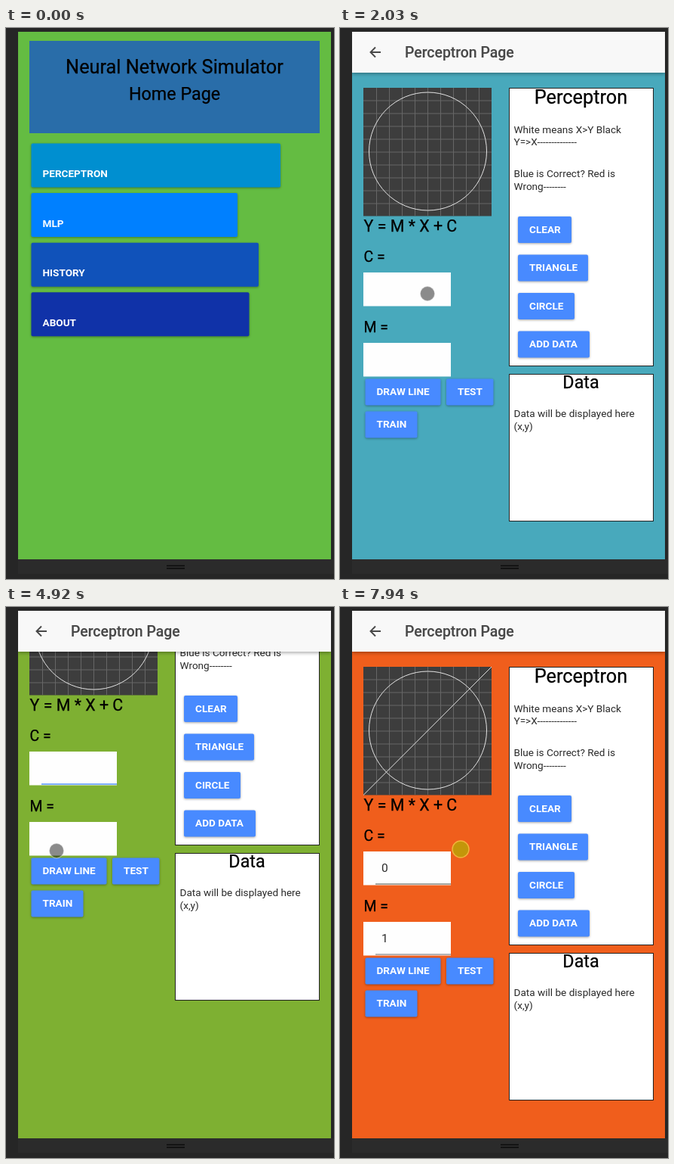
Write an HTML page that moves like this. It is 435x728 px and loops after 8 s.

```html
<!DOCTYPE html>
<html lang="en">
<head>
<meta charset="utf-8">
<title>Neural Network Simulator</title>
<style>
  html, body { margin: 0; width: 100%; height: 100%; overflow: hidden; background: #262626; }
  svg { display: block; width: 435px; height: 728px; font-family: Roboto, sans-serif; }
  .head { stroke: #000; stroke-width: .25px; }
  .body { font-size: 13.58px; fill: #2a2a2a; }
  .label { font-size: 13.58px; font-weight: 700; fill: #fff; }
  .title { font-size: 19.4px; font-weight: 500; fill: #484848; stroke: #484848; stroke-width: .15px; }
  .button { filter: drop-shadow(0 1.5px 1.5px rgba(0, 0, 0, .35)); }
  .toolbar { filter: drop-shadow(0 2px 2px rgba(0, 0, 0, .3)); }
</style>
</head>
<body>
<svg id="stage" viewBox="0 0 435 728"></svg>
<script>
const LOOP = 8000;
const stage = document.getElementById('stage');

const rect = (x, y, w, h, fill, extra = '') =>
  `<rect x="${x}" y="${y}" width="${w}" height="${h}" fill="${fill}" ${extra}/>`;
const text = (x, y, str, cls, extra = '') =>
  `<text x="${x}" y="${y}" class="${cls}" ${extra}>${str}</text>`;
const heading = (x, y, size, str, anchor = 'start') =>
  text(x, y, str, 'head', `font-size="${size}" text-anchor="${anchor}"`);
const button = (x, y, w, str, h = 35, fill = '#488aff') =>
  rect(x, y, w, h, fill, 'rx="2" class="button"') +
  text(x + 15, y + (h > 40 ? h - 13.5 : 21.5), str, 'label');
const panel = (y, h) => rect(224.5, y + .5, 191, h - 1, '#fff', 'stroke="#222"');
const input = (id, y) => rect(31, y, 116, 44.5, '#fefefe') +
  rect(47, y + 42, 100, 2, '#488aff', `id="${id}Line"`) +
  text(55, y + 27, '', 'body', `id="${id}Value" style="font-size:15.5px"`);

const menu = [
  ['PERCEPTRON', 330.5, '#008fd0'],
  ['MLP', 273.5, '#0080ff'],
  ['HISTORY', 301.5, '#1052ba'],
  ['ABOUT', 289, '#1032a8'],
].map(([name, width, fill], i) => button(33.5, 152.5 + 65.6 * i, width, name, 58, fill)).join('');

const tools = [['CLEAR', 71], ['TRIANGLE', 93], ['CIRCLE', 75], ['ADD DATA', 95]]
  .map(([name, width], i) => button(236, 249 + 50.5 * i, width, name)).join('');

const grid = Array.from({ length: 9 }, (_, i) => {
  const d = 17 * (i + 1);
  return `M${31.5 + d} 79v169M31 ${79 + d}h170`;
}).join('');

const home = rect(16, 5, 415, 697, '#64bc42', 'id="homeBg"') +
  rect(31, 17, 385, 122, '#296da9') +
  heading(223.5, 60, 25.3, 'Neural Network Simulator', 'middle') +
  heading(223.5, 95, 23.3, 'Home Page', 'middle') + menu;

const content = rect(31, 79, 170, 169.5, '#3d3d3d') +
  `<path d="${grid}" stroke="#666" fill="none"/>
   <circle cx="116.5" cy="163" r="78" fill="none" stroke="#e4e4e4"/>
   <path id="diagonal" d="M31 248.5L201 79" stroke="#e4e4e4"/>` +
  heading(31.5, 269, 21.4, 'Y = M * X + C') +
  heading(31.5, 309, 19.5, 'C =') + input('c', 323) +
  heading(31.5, 402, 19.5, 'M =') + input('m', 416) +
  rect(54.5, 429, 1, 19, '#9cc0f0', 'id="caret"') +
  button(33.5, 463.5, 100, 'DRAW LINE') +
  button(141, 463.5, 62.5, 'TEST') +
  button(33.5, 506.5, 69, 'TRAIN') +
  panel(79, 368) +
  heading(319.5, 100, 25.3, 'Perceptron', 'middle') +
  text(230.5, 139, 'White means X&gt;Y Black', 'body') +
  text(230.5, 155, 'Y=&gt;X' + '-'.repeat(14), 'body') +
  text(230.5, 197, 'Blue is Correct? Red is', 'body') +
  text(230.5, 213.5, 'Wrong' + '-'.repeat(8), 'body') + tools +
  panel(457, 195) +
  heading(319.5, 476, 23.3, 'Data', 'middle') +
  text(230.5, 514, 'Data will be displayed here', 'body') +
  text(230.5, 530.5, '(x,y)', 'body');

const toolbar = rect(16, 5, 415, 54, '#f8f8f8', 'class="toolbar"') +
  `<path d="M54 32H41M47 25.5L40.5 32L47 38.5" fill="none" stroke="#484848" stroke-width="1.9"/>` +
  text(86, 38.5, 'Perceptron Page', 'title');

stage.innerHTML =
  `<clipPath id="screen"><rect x="16" y="5" width="415" height="697"/></clipPath>` +
  rect(0, 0, 435, 728, '#262626') + rect(16, 702, 419, 19, '#2b2b2b') +
  `<path d="M213 710.5h24M213 714h24" stroke="#0c0c0c" stroke-width="1.4"/>
   <g clip-path="url(#screen)">
     ${home}
     <g id="page">
       ${rect(16, 5, 415, 745, '#4ba8c0', 'id="pageBg"')}
       <g id="content">${content}</g>
       ${rect(425, 59, 3, 462, '#000', 'id="scrollbar"')}
       ${toolbar}
     </g>
     <circle id="ripple" cx="175" cy="167" fill="#fff" fill-opacity=".13"/>
     <circle id="pointer" stroke-width="1.4"/>
   </g>`;

const el = {};
stage.querySelectorAll('[id]').forEach(node => el[node.id] = node);

const linear = (t, start, length) => Math.min(1, Math.max(0, (t - start) / length));
const smooth = (t, start, length) => {
  const p = linear(t, start, length);
  return p * p * (3 - 2 * p);
};
const mix = (a, b, p) => a.map((v, i) => v + (b[i] - v) * p);
const rgb = values => `rgb(${values.map(Math.round)})`;

// Passes through [time, values] stops in straight lines.
const through = (stops, t) => stops.slice(1).reduce(
  (now, [time, values], i) => mix(now, values, linear(t, stops[i][0], time - stops[i][0])),
  stops[0][1]);

const blue = [62, 162, 233], green = [100, 188, 66], olive = [126, 176, 50],
  mustard = [150, 160, 40], orange = [207, 120, 24], red = [240, 94, 28];
const pageColors = [[1560, blue], [3300, green], [4920, olive], [6010, orange], [7940, red]];

const pointerStops = [
  [1640, [175, 167]], [2030, [116, 351]], [3050, [100, 353]], [4920, [67, 322]],
  [5500, [70, 315]], [6010, [121, 244]], [6400, [95, 256]], [7020, [95, 256]], [7700, [160, 320]],
];

function pointerAt(t) {
  if (t > 1500) return through(pointerStops, t);
  // A curved sweep up the screen, then two short moves onto the first button.
  const p = linear(t, 390, 320);
  const sweep = mix(mix([324, 675], [30, 300], p), mix([30, 300], [232, 116], p), p);
  return mix(mix(sweep, [194, 143], linear(t, 860, 160)), [175, 167], linear(t, 1250, 150));
}

// [start, length, distance]
const scrolls = [[2480, 370, 66], [3380, 370, 66], [5380, 420, 92.5], [7100, 300, -224.5]];

const set = (node, attrs) => {
  for (const key in attrs) node.setAttribute(key, attrs[key]);
};
const show = (node, on) => set(node, { visibility: on ? 'visible' : 'hidden' });

function draw(t) {
  const enter = 1 - Math.pow(1 - linear(t, 1560, 280), 3.75);
  set(el.homeBg, { fill: rgb(mix(green, mustard, smooth(t, 0, 1630))) });
  set(el.pageBg, { fill: rgb(through(pageColors, t)) });
  set(el.page, { opacity: enter, transform: `translate(0 ${40 * (1 - enter)})` });

  const scroll = scrolls.reduce((sum, [start, length, by]) => sum + by * smooth(t, start, length), 0);
  const scrolling = scrolls.some(([start, length, by]) => by > 0 && t > start && t < start + length + 250);
  set(el.content, { transform: `translate(0 ${-scroll})` });
  set(el.scrollbar, { y: 59 + scroll * .74, opacity: scrolling ? .08 : 0 });

  const submitted = t >= 7020;
  el.cValue.textContent = t >= 5120 ? '0' : '';
  el.mValue.textContent = t >= 6400 ? '1' : '';
  show(el.cLine, t >= 2410);
  set(el.cLine, { fill: submitted ? '#a4a8a4' : t >= 5120 ? '#84d69a' : '#7fb0ff' });
  show(el.mLine, t >= 5350);
  set(el.mLine, { fill: submitted ? '#b4b4b4' : '#8db8fa' });
  show(el.caret, t >= 5400 && t < 6400);
  show(el.diagonal, t >= 6900);

  const [cx, cy] = pointerAt(t);
  const pressed = t >= 7800;
  show(el.pointer, t >= 390);
  set(el.pointer, {
    cx, cy, r: pressed ? 11 : 9.7,
    fill: pressed ? '#c3960a' : 'rgba(0,0,0,.45)',
    stroke: pressed ? '#f2b43c' : 'rgba(255,255,255,.4)',
  });
  set(el.ripple, { r: 35 * smooth(t, 1540, 90), opacity: 1 - linear(t, 1640, 140) });
}

function tick() {
  draw(performance.now() % LOOP);
  requestAnimationFrame(tick);
}
tick();
</script>
</body>
</html>
```
